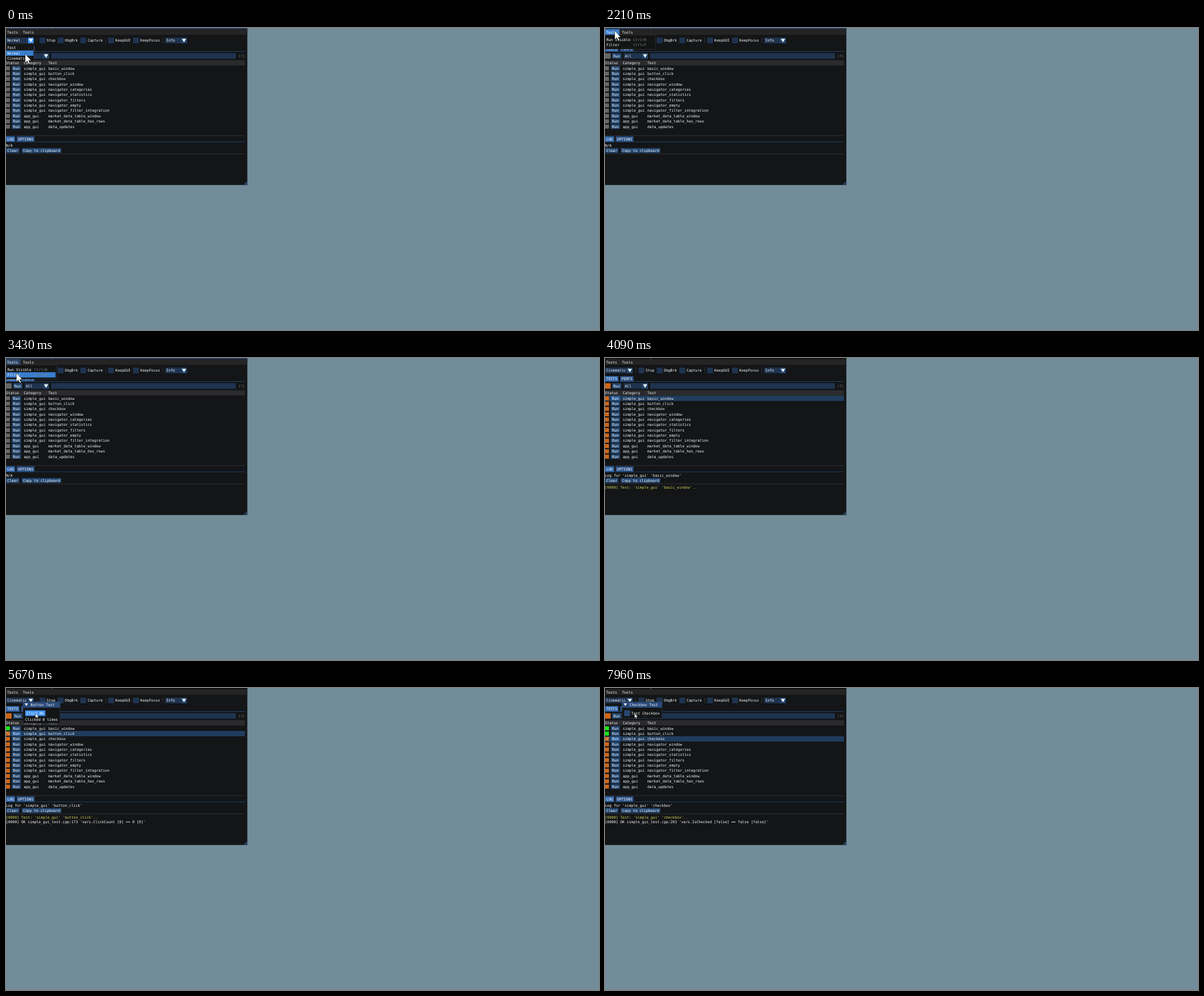
An HTML page that plays this animation: 1050 by 534 pixels, repeating every 8 s.

```html
<!DOCTYPE html>
<html lang="en">
<head>
<meta charset="utf-8">
<title>Test runner</title>
<style>
  html, body { margin: 0; width: 100%; height: 100%; overflow: hidden; background: #738c99; }
  svg { display: block; width: 100vw; height: 100vh; }
  text { font: 6.41px "DejaVu Sans Mono", monospace; white-space: pre; text-rendering: geometricPrecision; }
</style>
</head>
<body>
<svg id="stage" viewBox="0 0 1050 534"></svg>
<script>
const LOOP = 8000;
const C = {
  win: '#131517', bar: '#242424', popup: '#131414', title: '#294a7a', idle: '#0a0a0a',
  frame: '#1f334f', button: 'rgba(66,150,250,.4)', hot: '#4296fa', press: '#0f87fa',
  head: 'rgba(66,150,250,.31)', headHot: '#397dcd', tab: '#2b5186', tabOn: '#3369ad',
  line: '#3b3b44', grey: '#666', wait: '#cc661a', pass: '#1ae61a', dim: '#808080', note: '#d9d95a'
};

// Screen updates: [first, last, count]
const UPDATES = [
  [120, 120, 1], [350, 350, 1], [490, 610, 2], [980, 1720, 7], [1840, 1960, 2], [2210, 2210, 1],
  [2350, 3070, 7], [3190, 3430, 3], [3580, 3700, 2], [4090, 4820, 7], [4940, 5670, 7],
  [5800, 6530, 7], [6680, 6800, 2], [6950, 6950, 1], [7100, 7840, 7], [7960, 7960, 1]
];
const STEPS = [0];
for (const [a, b, n] of UPDATES)
  for (let i = 0; i < n; i++)
    STEPS.push(i === 0 ? a : i === n - 1 ? b : Math.floor(a + (b - a) * i / (n - 1)) - 10);

// Pointer path: [time, x, y]
const PATH = [
  [0, 34, 46], [350, 32.7, 47.3], [610, 32.5, 48.5], [980, 31.5, 46], [1340, 29.3, 30],
  [1590, 26, 18], [1720, 21, 6], [1960, 17.2, 4.8], [2210, 17.2, 4.8], [2590, 34, 6],
  [2710, 35, 7], [2950, 20, 6], [3190, 18, 13], [3430, 18.3, 26.5], [3580, 18.5, 24], [3700, 18.5, 22]
];

const TESTS = [
  ...['basic_window', 'button_click', 'checkbox', 'navigator_window', 'navigator_categories',
    'navigator_statistics', 'navigator_filters', 'navigator_empty', 'navigator_filter_integration'
  ].map(name => ['simple_gui', name]),
  ...['market_data_table_window', 'market_data_table_has_rows', 'data_updates'].map(name => ['app_gui', name])
];

const esc = s => s.replace(/&/g, '&amp;').replace(/</g, '&lt;');
const rect = (x, y, w, h, fill, extra = '') =>
  `<rect x="${x}" y="${y}" width="${w}" height="${h}" fill="${fill}" ${extra}/>`;
const text = (x, mid, s, fill = '#fff') => `<text x="${x}" y="${mid + 2.3}" fill="${fill}">${esc(s)}</text>`;
const panel = (x, y, w, h) =>
  rect(x, y, w, h, C.popup, 'fill-opacity=".96" stroke="#3b3b45" stroke-width=".6"');
const button = (x, y, w, h, label, fill = C.button) =>
  rect(x, y, w, h, fill) + text(x + 2.3, y + h / 2, label);
const down = (x, y, r) => `<path d="M${x - r} ${y - r * .75}h${2 * r}l${-r} ${r * 1.6}z" fill="#fff"/>`;
const combo = (x, y, w, label, open) =>
  rect(x, y, w - 10, 10, C.frame) + rect(x + w - 10, y, 10, 10, open ? C.hot : C.button) +
  text(x + 2.2, y + 5, label) + down(x + w - 5, y + 4.9, 3.7);
const check = (x, label) => rect(x, 17, 10.5, 10, C.frame) + text(x + 12.8, 22, label);
const pointer = (x, y, k) =>
  `<path transform="translate(${x} ${y}) scale(${k})" d="M0 0V15.5L3.6 12.2L6.2 17.5L8.5 16.5L6 11.4H10.6Z"
    fill="#fff" stroke="#000" stroke-width="${.5 / k}"/>`;

function along(t) {
  let i = 1;
  while (i < PATH.length - 1 && PATH[i][0] < t) i++;
  const [ta, xa, ya] = PATH[i - 1], [tb, xb, yb] = PATH[i];
  const k = Math.min(1, Math.max(0, (t - ta) / (tb - ta)));
  return [xa + (xb - xa) * k, ya + (yb - ya) * k];
}

function toolbar(t) {
  let s = combo(0, 17, 49, t < 980 ? 'Normal' : 'Cinematic', t < 980 || (t >= 1460 && t < 1720));
  for (const x of [54.2, 176, 277]) s += rect(x, 17, .7, 10, C.line);
  s += check(59.2, 'Stop') + check(91.5, 'DbgBrk') + check(131.6, 'Capture');
  s += check(180.8, 'KeepGUI') + check(225, 'KeepFocus');
  return s + combo(281.6, 17, 38.6, 'Info');
}

function spinner(t, y) {
  const turn = (Math.floor((t - 4688) / 118) + (t < 7200 ? 3 : 2)) % 4;
  const d = ['M4 -2.5V2.5', 'M1.7 2L6 -2', 'M1.3 0H6.7', 'M1.7 -2L6 2'][turn];
  return `<path transform="translate(0 ${y})" d="${d}" stroke="#fff" stroke-width=".8"/>`;
}

function table(t, current) {
  let s = rect(0, 57, 423, 9.2, '#2b2b2e');
  for (const x of [28.8, 72.3]) s += rect(x, 57, .6, 9.2, '#3a3a40');
  s += text(0, 62, 'Status') + text(31.5, 62, 'Category') + text(75, 62, 'Test');
  TESTS.forEach(([group, name], i) => {
    const y = 71.2 + i * 9.37;
    const fill = current < 0 ? C.grey : i < current ? C.pass : C.wait;
    if (i === current) s += rect(0, y - 4.6, 423, 9.3, C.head);
    s += rect(0, y - 3.4, 7, 7, fill);
    if (i === current) s += spinner(t, y);
    s += button(10.3, y - 4, 16.2, 8, 'Run') + text(31.5, y, group) + text(75, y, name);
  });
  return s;
}

function logPane(t, current) {
  let s = rect(0, 189.8, 423, .8, C.line);
  s += button(0, 191.6, 16, 9.6, 'LOG', C.tabOn) + button(19, 191.6, 31.5, 9.6, 'OPTIONS', C.tab);
  s += rect(0, 200.8, 423, .7, '#2b5688');
  const [group, name] = TESTS[Math.max(0, current)];
  s += text(0, 207.6, current < 0 ? 'N/A' : `Log for '${group}' '${name}'`);
  s += button(0, 212.4, 23.5, 8.4, 'Clear') + button(28, 212.4, 70, 8.4, 'Copy to clipboard');
  s += rect(0, 222.2, 423, .7, C.line);
  if (current < 0) return s;
  const lines = [`[0000] Test: '${group}' '${name}'..`];
  if (current === 1) {
    lines.push("[0000] OK simple_gui_test.cpp:173 'vars.ClickCount [0] == 0 [0]'");
    if (t >= 5900) lines.push("[0061] OK simple_gui_test.cpp:177 'vars.ClickCount [1] == 1 [1]'");
    if (t >= 7100) lines.push('[0092] Success.');
  }
  if (current === 2) lines.push("[0000] OK simple_gui_test.cpp:203 'vars.IsChecked [false] == false [false]'");
  lines.forEach((l, i) => s += text(0, 228.4 + i * 8.4, l, i ? '#fff' : C.note));
  return s;
}

function speedList(t) {
  const over = t < 490 ? 1 : 2;
  let s = panel(0, 28, 49.4, 31);
  ['Fast', 'Normal', 'Cinematic'].forEach((label, i) => {
    const y = 35 + i * 9.4;
    if (i === over || i === 1) s += rect(0, y - 4.7, 48.6, 9.4, i === over ? C.headHot : C.head);
    s += text(2.2, y, label);
  });
  return s;
}

function tooltip() {
  const lines = [
    'Running speed',
    '- Fast: Run tests as fast as possible (no delay/vsync, teleport mouse, etc.).',
    '- Normal: Run tests at human watchable speed (for debugging).',
    '- Cinematic: Run tests with pauses between actions (for e.g. tutorials).'
  ];
  return panel(36, 22.3, 305.6, 37.4) +
    lines.map((l, i) => text(40.4, 30.2 + i * 7.17, l)).join('');
}

function testsMenu(t) {
  const over = t < 3300 ? -1 : t >= 3430 && t < 3580 ? 1 : 0;
  let s = panel(0, 12.2, 89.4, 25.2);
  [['Run Visible', 'Ctrl+R'], ['Filter', 'Ctrl+F']].forEach(([label, key], i) => {
    const y = 20.5 + i * 9.3;
    if (i === over) s += rect(0, y - 4.7, 87.8, 9.4, C.headHot);
    s += text(2.4, y, label) + text(50, y, key, C.dim);
  });
  return s;
}

function toolsMenu() {
  const items = ['Metrics/Debugger', 'Debug Log', 'Stack Tool', 'Item Picker', 'Capture Tool', 'Perf Tool'];
  return panel(25.5, 12.2, 83, 64.4) + rect(26, 54.3, 82, .7, C.line) +
    items.map((l, i) => text(30, 20.5 + i * 9.37 + (i > 3 ? 2 : 0), l)).join('');
}

function testWindow(t, current) {
  const clicking = current === 1;
  const w = clicking ? 66 : 71;
  let s = panel(30, 24.4, w, clicking ? 38.4 : 29.4) + rect(30, 24.4, w, 10.4, C.title);
  s += down(36, 29.3, 2.9) + text(43.6, 29.8, clicking ? 'Button Test' : 'Checkbox Test');
  if (!clicking) return s + rect(34, 39.5, 10.5, 10, '#274a72') + text(46.6, 44.6, 'Test Checkbox');
  const fill = t < 5530 ? C.button : t >= 5800 && t < 5900 ? C.press : C.hot;
  s += button(34, 39.6, 35.6, 9.8, 'Click Me', fill);
  return s + text(34, 56, `Clicked ${t < 5900 ? 0 : 1} times`);
}

function scene(t) {
  const current = t < 4090 ? -1 : t < 4560 ? 0 : t < 7200 ? 1 : 2;
  const tools = t >= 2460 && t < 2820;
  const tests = t >= 2210 && t < 4090 && !tools;

  let s = rect(0, 0, 1050, 534, '#738c99') + rect(0, 0, 427.3, 277.6, C.win);
  s += rect(0, 0, 427.3, 1.6, current < 0 ? C.title : C.idle) + rect(80.4, 0, 1.6, .7, '#bbb');
  s += rect(0, 1.6, 427.3, 10.5, C.bar);
  if (t >= 1840 && t < 4090 && !tools) s += rect(0, 2.2, 25.6, 9.8, t < 3180 ? C.headHot : C.head);
  if (tools) s += rect(25.6, 2.2, 28, 9.8, C.headHot);
  s += text(2, 7.2, 'Tests') + text(30, 7.2, 'Tools') + toolbar(t);

  s += button(0, 32, 23.6, 9.6, 'TESTS', C.tabOn) + button(27, 32, 23.6, 9.6, 'PERFS', C.tab);
  s += rect(0, 41.2, 423, .7, '#2b5688');
  s += rect(0, 44.6, 10, 9.6, current < 0 ? C.grey : C.wait) + button(12.6, 44.6, 16.4, 9.6, 'Run');
  s += combo(33, 44.4, 43, 'All') + rect(80, 44.4, 327, 10, C.frame) + text(411.4, 49.6, '(?)', C.dim);
  s += table(t, current) + logPane(t, current);
  s += '<path d="M427.3 270.5V277.6H420Z" fill="#27415f"/>';

  if (t < 980) s += speedList(t);
  if (t >= 1580 && t < 1840) s += tooltip();
  if (tests) s += testsMenu(t);
  if (tools) s += toolsMenu();
  if (current > 0) s += testWindow(t, current);

  if (t < 4090) s += pointer(...along(t), 1);
  else if (t >= 4940) {
    const k = Math.min(1, (t - 4940) / 600);
    const e = k * k * (3 - 2 * k);
    s += pointer(52.2 * e, 44.6 * e, .56);
  }
  return s;
}

const stage = document.getElementById('stage');
const start = performance.now();
let shown = -1;

function tick() {
  const t = (performance.now() - start) % LOOP;
  let i = STEPS.length - 1;
  while (STEPS[i] > t) i--;
  if (i !== shown) {
    shown = i;
    stage.innerHTML = scene(STEPS[i]);
  }
  requestAnimationFrame(tick);
}
tick();
</script>
</body>
</html>
```
